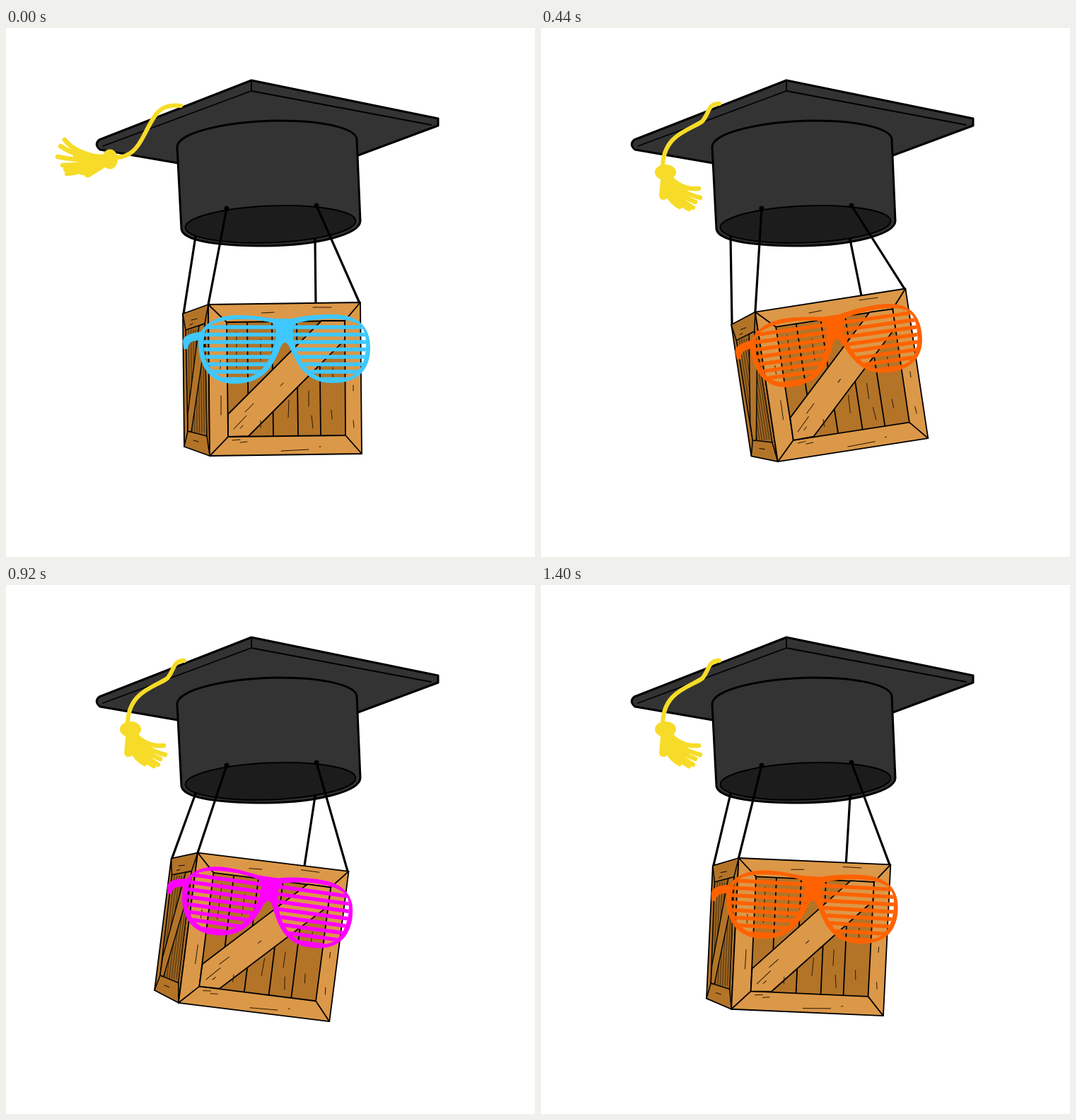
An HTML page with a canvas that plays this animation: 748 by 748 pixels, repeating every 1440 ms.

```html
<!DOCTYPE html>
<html>
<head>
<meta charset="utf-8">
<style>
html, body { margin: 0; width: 100%; height: 100%; overflow: hidden; background: #fff; }
canvas { display: block; }
</style>
</head>
<body>
<canvas id="stage" width="748" height="748"></canvas>
<script>
const ctx = document.getElementById('stage').getContext('2d');
const STEP = 40, STEPS = 36;
const PIVOT = [369.5, 276];
const GLASSES = ['#3fc8ff', '#ff6200', '#b916ff', '#ff00ff'];
const LIGHT = '#db9848', DARK = '#b37428', SHADE = '#9c6522', YELLOW = '#f6dc28';

// Swing phase in degrees at a few steps; the start hesitates for one step.
const PHASE = [[0, 7.4], [1, 7.4], [4, 33], [11, 105], [15, 147], [20, 192], [26, 255], [35, 347.5]];

// Each pose: cord, knob (x, y, rx, ry), two bend points and strand tips.
const TASSELS = [
  { cord: 'M247 110C216 106 210 124 196 150C186 170 176 183 155 183', knob: [147, 185.5, 11, 14],
    bends: [[118, 209], [98, 179]],
    tips: [[106, 204], [86, 206], [84, 200], [80, 194], [73, 182], [77, 167], [83, 158]] },
  { cord: 'M247 110C225 112 218 132 200 150C180 163 163 170 156 190', knob: [152, 194, 13, 12],
    bends: [[122, 207], [140, 231]],
    tips: [[98, 236], [103, 243], [110, 248], [118, 252], [127, 254]] },
  { cord: 'M249 109C228 112 222 136 206 151C186 164 165 172 161 197', knob: [162, 202, 13, 10.5],
    bends: [[138, 240], [170, 242]],
    tips: [[157, 269], [165, 267], [173, 267], [181, 265], [190, 261]] },
  { cord: 'M252 107C236 106 238 121 228 132C210 145 172 150 172 198', knob: [176, 204, 15, 11],
    bends: [[170, 238], [196, 230]],
    tips: [[196, 253], [209, 256], [215, 254], [218, 246], [225, 240], [223, 227]] }
];

const lerp = (a, b, u) => a + (b - a) * u;

function swing(n) {
  const i = Math.max(1, PHASE.findIndex(k => k[0] >= n));
  const [n0, p0] = PHASE[i - 1], [n1, p1] = PHASE[i];
  const phase = lerp(p0, p1, (n - n0) / (n1 - n0)) * Math.PI / 180;
  return (1.23 - 9.6 * Math.sin(phase)) * Math.PI / 180;
}

function shape(d, fill, stroke, width = 1.8) {
  const path = new Path2D(d);
  if (fill) {
    ctx.fillStyle = fill;
    ctx.fill(path, 'evenodd');
  }
  if (stroke) {
    ctx.strokeStyle = stroke;
    ctx.lineWidth = width;
    ctx.stroke(path);
  }
  return path;
}

function ellipse(x, y, rx, ry, turn, fill, width) {
  ctx.beginPath();
  ctx.ellipse(x, y, rx, ry, turn, 0, 7);
  ctx.fillStyle = fill;
  ctx.fill();
  if (width) {
    ctx.strokeStyle = '#000';
    ctx.lineWidth = width;
    ctx.stroke();
  }
}

function drawHat() {
  shape('M347 74L611 128V138L498 180H243V191L133 172Q124 165 132 158Z', '#333');
  shape('M243 191L133 172Q124 165 132 158L347 74L611 128V138L498 180', null, '#000', 3);
  shape('M137 167L347 89L601 137M347 74V89', null, '#000', 1.8);
  shape('M242 168C243 148 310 132 386 131C450 131 494 142 496 157L501 273' +
        'C500 292 440 307 370 308C310 308 250 303 248 284Z', '#333', '#000', 3);
  ellipse(374, 277.5, 120.5, 26, -0.04, '#1c1c1c', 2);
}

function drawTassel({ cord, knob, bends, tips }) {
  const [x, y, rx, ry] = knob;
  shape(cord, null, YELLOW, 6);
  ellipse(x, y, rx, ry, 0, YELLOW);
  ctx.beginPath();
  tips.forEach((tip, i) => {
    const u = i / (tips.length - 1);
    ctx.moveTo(x, y);
    ctx.quadraticCurveTo(lerp(bends[0][0], bends[1][0], u), lerp(bends[0][1], bends[1][1], u), ...tip);
  });
  ctx.lineWidth = 6.5;
  ctx.stroke();
  // A thicker inner layer closes the gaps near the knob.
  ctx.beginPath();
  for (const u of [0.12, 0.5, 0.88]) {
    ctx.moveTo(x, y);
    ctx.lineTo(lerp(bends[0][0], bends[1][0], u), lerp(bends[0][1], bends[1][1], u));
  }
  ctx.lineWidth = 12;
  ctx.stroke();
}

function drawStrings(angle) {
  const c = Math.cos(angle), s = Math.sin(angle);
  const ropes = [[268, 295, 251, 404], [312, 255, 286, 391], [437, 299, 438, 391], [439, 251, 500, 389]];
  ctx.strokeStyle = '#000';
  ctx.lineWidth = 3.2;
  ctx.beginPath();
  for (const [x, y, bx, by] of ropes) {
    const dx = bx - PIVOT[0], dy = by - PIVOT[1];
    ctx.moveTo(x, y);
    ctx.lineTo(PIVOT[0] + dx * c - dy * s, PIVOT[1] + dx * s + dy * c);
  }
  ctx.stroke();
  for (const [x, y] of ropes) ellipse(x, y, y < 280 ? 3.5 : 2.2, y < 280 ? 3.5 : 2.2, 0, '#000');
}

function drawCrate() {
  shape('M250 404L286 391L288 605L252 592Z', DARK, '#000');
  shape('M254 427L281 418L284 577L257 570Z', SHADE, '#000', 1.5);
  let grain = '';
  for (let x = 258; x < 282; x += 3.4) grain += `M${x} 427L${x + 2} 572`;
  shape(grain, null, '#3c2508', 0.8);
  shape('M257 545L273 421L281 418L280 452L262 571L257 570Z', DARK, '#000', 1.4);
  shape('M250 404L254 427M286 391L281 418M252 592L257 570M288 605L284 577', null, '#000', 1.5);
  shape('M262 413L270 411M265 583L272 585M260 420L264 418', null, '#000', 0.9);

  shape('M286 391L501 388L503 602L288 605Z', LIGHT, '#000');
  shape('M312 416L479 414L480 576L314 578Z', DARK, '#000');
  shape('M341 416L343 577M376 416L378 577M411 415L413 577M443 415L445 576', null, '#000');
  shape('M314 546L446 414H479V441L343 577L314 578Z', LIGHT, '#000');
  shape('M286 391L312 416M501 388L479 414M288 605L314 578M503 602L480 576', null, '#000');
  shape('M434 395H460M361 403L379 402M389 598L428 596M331 586L341 585M320 583L331 582M443 592H445' +
        'M304 520V547M303 470V482M491 555L492 565M491 505V513M322 567L340 548M331 566L335 562' +
        'M338 543L350 531M388 506L392 502M400 526L399 551M428 513V535M432 548L434 566M460 540L461 553' +
        'M326 430V480M360 440V470M462 480V495M360 555V565', null, '#2a1904', 1);
}

function drawGlasses(color) {
  const left = 'M282 428C288 410 345 408 376 417Q384 420 381 441C373 478 355 497 323 497C292 497 278 472 279 445Z';
  const right = 'M410 418C445 408 492 409 503 423C511 434 511 460 503 477C494 495 478 497 462 497C430 497 412 470 407 441Q404 422 410 418Z';
  const outer = 'M272 444C273 418 300 406 328 406C352 406 372 411 384 411H404C420 407 440 405 460 405' +
    'C498 405 515 422 515 452C515 485 496 502 462 502C426 502 413 478 403 456Q394 433 386 457' +
    'C374 487 356 503 323 503C288 503 272 478 272 444Z';
  shape(outer + left + right, color);
  shape('M279 429Q250 432 250 443L251 454H257Q257 446 264 443L280 440Z', color);
  ctx.save();
  ctx.clip(new Path2D(left + right));
  ctx.fillStyle = color;
  for (let y = 423; y < 500; y += 10.5) ctx.fillRect(270, y - 2.7, 245, 5.4);
  ctx.restore();
}

function draw(now) {
  const n = Math.floor(now / STEP) % STEPS;
  const angle = swing(n);
  ctx.lineJoin = ctx.lineCap = 'round';
  ctx.fillStyle = '#fff';
  ctx.fillRect(0, 0, 748, 748);
  drawHat();
  drawTassel(TASSELS[n % 4]);
  drawStrings(angle);
  ctx.save();
  ctx.translate(...PIVOT);
  ctx.rotate(angle);
  ctx.translate(-PIVOT[0], -PIVOT[1]);
  drawCrate();
  drawGlasses(GLASSES[(n >> 1) % 4]);
  ctx.restore();
}

const start = performance.now();
function tick() {
  draw(performance.now() - start);
  requestAnimationFrame(tick);
}
tick();
</script>
</body>
</html>
```
